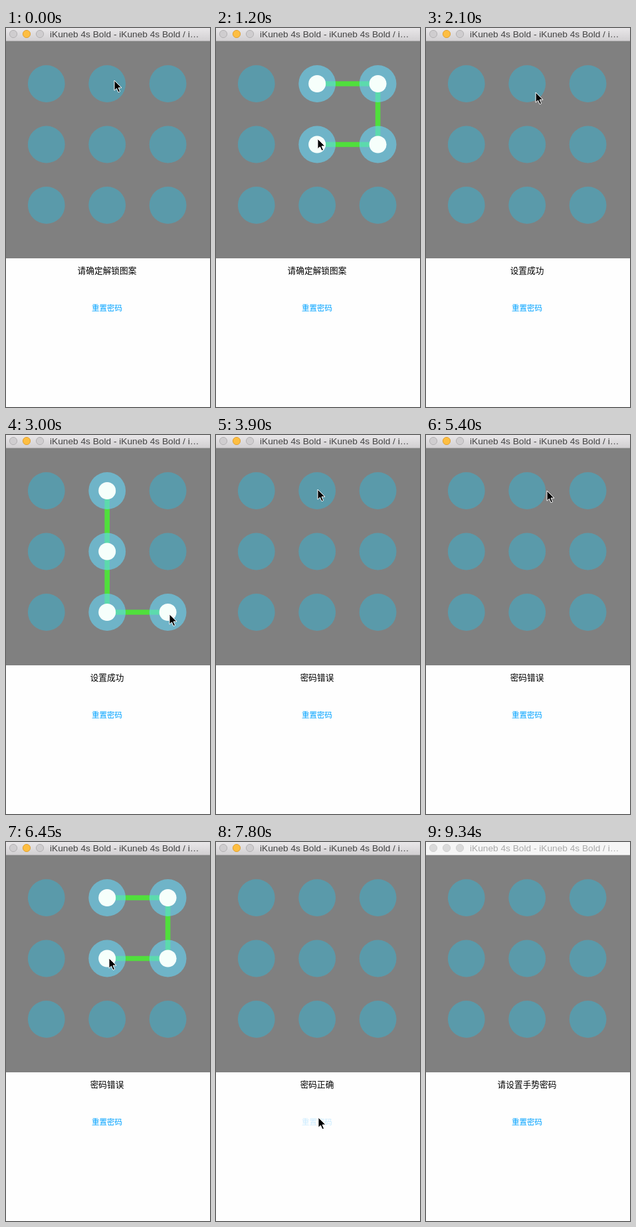
These frames come from a looping animation (307x571 px, 9440 ms). An HTML page:

```html
<!DOCTYPE html>
<html lang="zh-CN">
<head>
<meta charset="utf-8">
<title>手势密码</title>
<style>
  html, body { margin: 0; width: 100%; height: 100%; overflow: hidden; background: #fefefe; }
  svg { display: block; width: 307px; height: 571px; }
  text { font-family: "Noto Sans CJK SC", "Noto Sans CJK", sans-serif; text-anchor: middle; }
  #title { font: 13.7px "Liberation Sans", Arial, sans-serif; text-anchor: start; fill: #434343; }
  #edge { fill: #b4b2b4; }
  #lights circle { fill: #cfcdcf; stroke: #b3b1b3; }
  #lights .amber { fill: #fdbe41; stroke: #e0a133; }
  .idle #bar { fill: #f6f6f6; }
  .idle #edge { fill: #d1d1d1; }
  .idle #title { fill: #a9a9a9; }
  .idle #lights circle { fill: #dadada; stroke: #d0d0d0; }
  .key { fill: rgb(66, 172, 199); fill-opacity: .6; }
  .dot { fill: #f6fffb; visibility: hidden; }
  .lit .key { fill: rgb(101, 215, 248); }
  .lit .dot { visibility: visible; }
  #reset { fill: #00a2ff; }
</style>
</head>
<body>
<svg id="stage" viewBox="0 0 307 571">
  <defs>
    <linearGradient id="metal" x2="0" y2="1">
      <stop stop-color="#e9e7e9"/><stop offset="1" stop-color="#d1cfd1"/>
    </linearGradient>
  </defs>
  <rect id="bar" width="307" height="20" fill="url(#metal)"/>
  <rect id="edge" y="19" width="307" height="1"/>
  <g id="lights">
    <circle cx="11" cy="9" r="5.6"/>
    <circle cx="31" cy="9" r="5.6" class="amber"/>
    <circle cx="51" cy="9" r="5.6"/>
  </g>
  <text id="title" x="66" y="14">iKuneb 4s Bold - iKuneb 4s Bold / i…</text>
  <rect y="20" width="307" height="327" fill="#808080"/>
  <polyline id="trail" fill="none" stroke="#50df3c" stroke-width="7.6" stroke-linejoin="round"/>
  <g id="pad"></g>
  <text id="message" x="152" y="370" font-size="12.7"></text>
  <text id="reset" x="152" y="426" font-size="11.5">重置密码</text>
  <path id="cursor" d="M0 0V15.2L3.5 12L6 17.8L8.6 16.7L6.1 11H11Z" stroke="#fff" stroke-linejoin="round"/>
</svg>
<script>
const LOOP = 9440, STEP = 150, HIT = 28;
const $ = id => document.getElementById(id);

const nodes = Array.from({ length: 9 }, (_, i) => [60.8 + i % 3 * 91.4, 84 + (i / 3 | 0) * 91.5]);
$('pad').innerHTML = nodes.map(([x, y]) =>
  `<g><circle class="key" cx="${x}" cy="${y}" r="27.9"/><circle class="dot" cx="${x}" cy="${y}" r="13"/></g>`).join('');
const keys = [...$('pad').children];

// A move runs through its stops (node numbers or points); "up" marks a drag and its release time.
const moves = [
  { from: 150, to: 1200, up: 1500, stops: [[163, 79], 2, 5, [153, 167]] },
  { from: 1650, to: 2250, stops: [[153, 167], [178, 110], 1] },
  { from: 2250, to: 3000, up: 3150, stops: [1, 7, [246, 270]] },
  { from: 3000, to: 3600, stops: [[246, 270], [153, 82]] },
  { from: 4050, to: 4800, up: 5100, stops: [[153, 82], 7, 6] },
  { from: 4950, to: 5400, stops: [6, [182, 84]] },
  { from: 5400, to: 5550, stops: [[182, 84], 1] },
  { from: 5550, to: 6450, up: 6750, stops: [1, 2, 5, [155, 175]] },
  { from: 6900, to: 7800, stops: [[155, 175], [154, 415]] },
  { from: 7950, to: 8550, stops: [[154, 417], [276, 551]] }
];
const messages = [[0, '请确定解锁图案'], [1500, '设置成功'], [3150, '密码错误'], [6750, '密码正确'], [7950, '请设置手势密码']];
const resetOpacity = [[0, 1], [7800, .2], [7950, .6], [8100, 1]];

const current = (list, t) => list.filter(([start]) => start <= t).pop()[1];

function pointerAt(t) {
  const { from, to, stops } = moves.filter(m => m.from <= t).pop() || moves[0];
  const points = stops.map(s => nodes[s] || s);
  const progress = Math.min(1, Math.max(0, (t - from) / (to - from))) * (points.length - 1);
  const i = Math.min(points.length - 2, Math.floor(progress));
  return points[i].map((a, axis) => a + (points[i + 1][axis] - a) * (progress - i));
}

function visited(from, to) {
  const hits = new Set();
  for (let t = from; t <= to; t += STEP) {
    const [x, y] = pointerAt(t);
    const i = nodes.findIndex(n => Math.hypot(n[0] - x, n[1] - y) < HIT);
    if (i >= 0) hits.add(i);
  }
  return [...hits];
}

function draw(time) {
  const t = Math.floor(time / STEP) * STEP;
  const pointer = pointerAt(t);
  const drag = moves.find(m => t >= m.from && t < m.up);
  const chain = drag ? visited(drag.from, t) : [];

  keys.forEach((key, i) => key.classList.toggle('lit', chain.includes(i)));
  $('trail').setAttribute('points', chain.length ? [...chain.map(i => nodes[i]), pointer].join(' ') : '');
  $('message').textContent = current(messages, t);
  $('reset').style.opacity = current(resetOpacity, t);
  $('cursor').style.visibility = t < 8700 ? 'visible' : 'hidden';
  $('cursor').setAttribute('transform', `translate(${pointer})`);
  $('stage').classList.toggle('idle', time >= 9340);
}

const begin = performance.now();
function tick() {
  draw((performance.now() - begin) % LOOP);
  requestAnimationFrame(tick);
}
tick();
</script>
</body>
</html>
```
